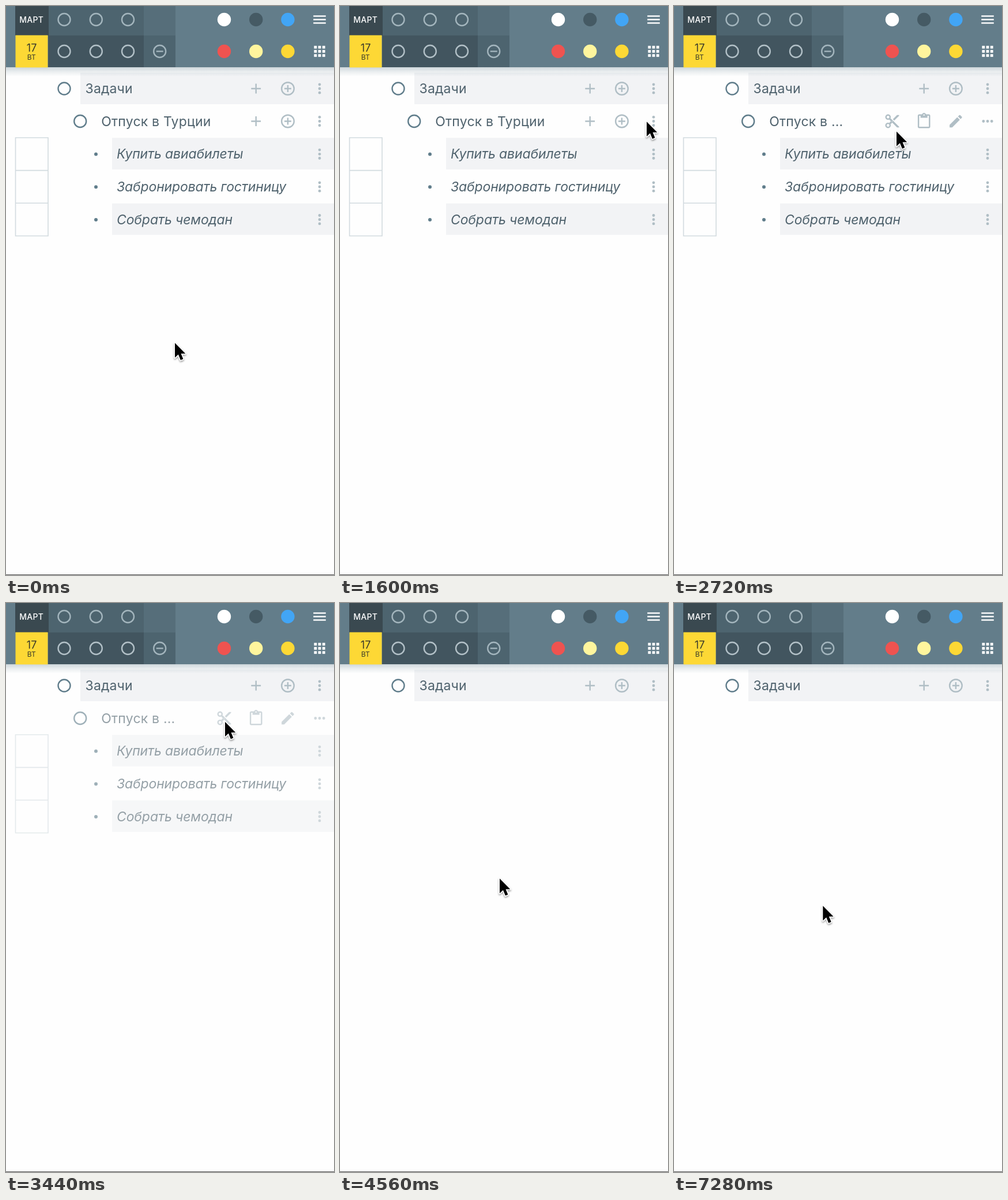
Write an HTML page that moves like this. It is 569 px wide and 985 px high and loops after 8080 ms.

```html
<!DOCTYPE html>
<html lang="ru">
<head>
<meta charset="utf-8">
<title>Задачи</title>
<style>
  html, body { margin: 0; width: 100%; height: 100%; overflow: hidden; background: #fefefe; }
  svg { display: block; width: 569px; height: 985px; }
  text { font-family: Inter, Roboto, sans-serif; font-size: 23px; letter-spacing: .2px; fill: #4f626d; font-optical-sizing: none; }
  .item { font-style: italic; letter-spacing: -.13px; }
  .mid { text-anchor: middle; letter-spacing: 0; }
</style>
</head>
<body>
<svg id="stage" viewBox="0 0 569 985">
  <defs>
    <linearGradient id="shade" x1="0" y1="0" x2="0" y2="1">
      <stop offset="0" stop-color="#607d8b" stop-opacity=".3"/>
      <stop offset=".5" stop-color="#607d8b" stop-opacity=".12"/>
      <stop offset="1" stop-color="#607d8b" stop-opacity="0"/>
    </linearGradient>
    <filter id="soft" x="-50%" y="-50%" width="200%" height="200%">
      <feDropShadow dx="0" dy="2" stdDeviation="1.6" flood-opacity=".4"/>
    </filter>
  </defs>
  <rect width="569" height="985" fill="#fefefe"/>
  <g id="list"></g>
  <g id="trip"></g>
  <g id="head"></g>
  <rect y="984" width="569" height="1" fill="#555"/>
  <path id="cursor" d="M0 0V25.5L5.9 20L9.9 29.6L14.4 27.7L10.5 18.4H18.3Z" fill="#000"
    stroke="#fff" stroke-width="3" stroke-linejoin="round" paint-order="stroke" filter="url(#soft)"/>
</svg>
<script>
const LOOP = 8080, TICK = 80;
const MENU_OPEN = 1840, CUT_START = 3360, CUT_END = 3680;
const COLS = [378.5, 433.7, 488.9, 544];
const GREY = '#b0bec5', SLATE = '#607d8b';
const $ = id => document.getElementById(id);

const rect = (x, y, w, h, fill) => `<rect x="${x}" y="${y}" width="${w}" height="${h}" fill="${fill}"/>`;
const dot = (x, y, r, fill) => `<circle cx="${x}" cy="${y}" r="${r}" fill="${fill}"/>`;
const ring = (x, y, color, r = 10.5, w = 2.4) =>
  `<circle cx="${x}" cy="${y}" r="${r}" fill="none" stroke="${color}" stroke-width="${w}"/>`;
const line = (d, color, w = 2.4) => `<path d="${d}" fill="none" stroke="${color}" stroke-width="${w}"/>`;
const label = (x, y, s, attrs = '') => `<text x="${x}" y="${y}" ${attrs}>${s}</text>`;
const plus = (x, y, r) => line(`M${x - r} ${y}h${2 * r}M${x} ${y - r}v${2 * r}`, GREY);
const dots = (x, y, dx, dy) => [-1, 0, 1].map(k => dot(x + k * dx, y + k * dy, 2.4, GREY)).join('');
const more = y => dots(COLS[3], y, 0, 7.2);
// 24-unit icon centred on a point
const icon = (x, y, body) =>
  `<g transform="translate(${x} ${y}) scale(1.2) translate(-12 -12)" fill="${GREY}">${body}</g>`;
const tools = y => plus(COLS[1], y, 8.4) + ring(COLS[2], y, GREY, 10.8) + plus(COLS[2], y, 6) + more(y);

const scissors = ring(6, 6, GREY, 3, 2) + ring(6, 18, GREY, 3, 2) +
  '<path d="M7.6 9.6L9.6 7.6L22 20V21H19ZM10 12L12 14L9.6 16.4L7.6 14.4ZM19 3H22V4L15 11L13 9Z"/>' +
  dot(12, 12, .5, '#fefefe');
const clipboard = '<path d="M19 2h-4.18C14.4.84 13.3 0 12 0c-1.3 0-2.4.84-2.82 2H5c-1.1 0-2 .9-2 2v16c0 1.1.9 2 2 2h14c1.1 0 2-.9 2-2V4c0-1.1-.9-2-2-2zm-7 0c.55 0 1 .45 1 1s-.45 1-1 1-1-.45-1-1 .45-1 1-1zm7 18H5V4h2v3h10V4h2v16z"/>';
const pencil = '<path d="M3 17.25V21h3.75L17.81 9.94l-3.75-3.75L3 17.25zM20.71 7.04c.39-.39.39-1.02 0-1.41l-2.34-2.34c-.39-.39-1.02-.39-1.41 0l-1.83 1.83 3.75 3.75 1.83-1.83z"/>';

function header() {
  let s = rect(0, 106, 569, 16, 'url(#shade)') + rect(0, 0, 569, 106, '#637d8a');
  s += rect(16, 0, 58, 51, '#3a4950') + rect(74, 0, 165, 51, '#4d646f') + rect(239, 0, 55, 51, '#566e7a');
  s += rect(73, 51, 166, 55, '#42555f') + rect(239, 51, 55, 55, '#4d646f');
  s += rect(16.5, 50.6, 56, 55.8, '#fdd835');
  s += label(44.2, 29, 'МАРТ', 'class="mid" style="font-size:14px;font-weight:500;letter-spacing:.3px;fill:#fff"');
  s += label(44.6, 79, '17', 'class="mid" style="font-size:18px;fill:#3a3a2a"');
  s += label(44.2, 92.5, 'ВТ', 'class="mid" style="font-size:12px;fill:#3a3a2a"');
  for (const x of [101, 156.3, 211.5]) s += ring(x, 23.5, '#a3b5bd') + ring(x, 78.5, '#b2c0c7');
  s += ring(266.7, 78.5, '#a3b5bd') + line('M260.7 78.5h12', '#a3b5bd');
  ['#fff', '#455a64', '#42a5f5'].forEach((c, i) => s += dot(COLS[i], 23.5, 11.7, c));
  ['#ef5350', '#fff59d', '#fdd835'].forEach((c, i) => s += dot(COLS[i], 78.5, 11.7, c));
  for (const k of [-1, 0, 1]) {
    s += line(`M533.2 ${23.5 + k * 6}h21.6`, '#fff');
    for (const j of [-1, 0, 1]) s += rect(541.6 + j * 7.2, 76.1 + k * 7.2, 4.8, 4.8, '#fff');
  }
  return s;
}

function trip() {
  let s = ring(128.7, 199.5, SLATE) + '<g id="closed">' + label(165.3, 207.5, 'Отпуск в Турции') + tools(199.5) + '</g>';
  s += '<g id="open">' + label(165.3, 207.5, 'Отпуск в ...') + icon(COLS[0], 199.5, scissors) +
    icon(COLS[1], 199.5, clipboard) + icon(COLS[2], 199.5, pencil) + dots(COLS[3], 199.5, 7.2, 0) + '</g>';
  ['Купить авиабилеты', 'Забронировать гостиницу', 'Собрать чемодан'].forEach((name, i) => {
    const y = 256.3 + i * 56.7;
    if (i !== 1) s += rect(184, y - 28, 385, 54.6, '#f2f3f5');
    s += dot(156, y + .3, 3, SLATE) + label(192, y + 8, name, 'class="item"') + more(y);
  });
  return s + line('M16.5 228H73V398H16.5ZM16.5 284.6H73M16.5 341.2H73', '#d2dbdf', 1.6);
}

$('head').innerHTML = header();
$('list').innerHTML = rect(129, 115.5, 440, 54.5, '#f2f3f5') + ring(101, 143, SLATE) + label(137.6, 151, 'Задачи') + tools(143);
$('trip').innerHTML = trip();

// pointer path: time, x, y
const PATH = [
  [800, 293, 583.3], [880, 304, 565], [960, 377, 447], [1040, 459, 312.3], [1120, 488, 267],
  [1280, 518, 221], [1600, 532, 200.3], [2240, 532, 200.3], [2320, 527, 204], [2400, 500, 212],
  [2560, 419, 220], [2720, 386, 217.3], [2880, 382, 210], [3120, 380, 205.8],
  [4080, 380, 205.8], [4160, 379.5, 206.3], [4240, 366, 241], [4400, 312, 386],
  [4560, 277, 477], [4720, 263, 513], [4960, 258.3, 524.3]
];

function pointer(t) {
  const i = PATH.findIndex(p => p[0] > t);
  if (i === 0) return PATH[0].slice(1);
  if (i < 0) return PATH[PATH.length - 1].slice(1);
  const a = PATH[i - 1], b = PATH[i], k = (t - a[0]) / (b[0] - a[0]);
  return [a[1] + (b[1] - a[1]) * k, a[2] + (b[2] - a[2]) * k];
}

function draw(ms) {
  const t = Math.floor((ms % LOOP) / TICK) * TICK;
  const menu = t >= MENU_OPEN;
  $('closed').style.display = menu ? 'none' : '';
  $('open').style.display = menu ? '' : 'none';
  const fade = (t + TICK - CUT_START) / (CUT_END + TICK - CUT_START);
  $('trip').style.opacity = 1 - Math.min(1, Math.max(0, fade));
  $('cursor').setAttribute('transform', `translate(${pointer(t).join(' ')})`);
}

const start = performance.now();
function loop() {
  draw(performance.now() - start);
  requestAnimationFrame(loop);
}
loop();
</script>
</body>
</html>
```
